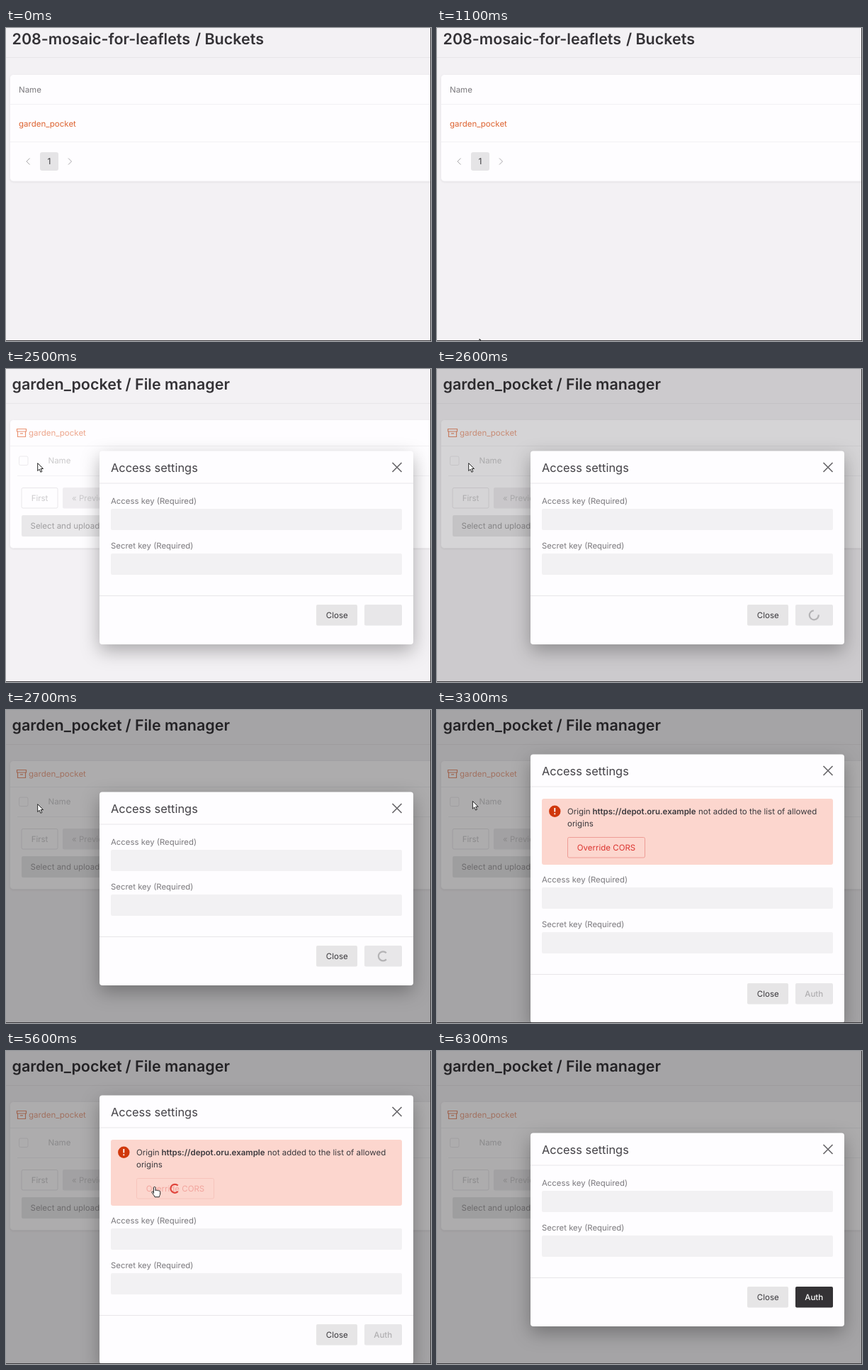
Recreate the animation shown at these times as an HTML page. Size 600 by 441 pixels, loop 7300 ms.

```html
<!DOCTYPE html>
<html lang="en">
<head>
<meta charset="utf-8">
<title>Bucket access</title>
<style>
  html, body { margin: 0; width: 100%; height: 100%; overflow: hidden; background: #f3f1f4; }
  svg { display: block; width: 600px; height: 441px; }
  text { font: 400 11.5px Inter, sans-serif; fill: #7b797d; text-rendering: geometricPrecision; }
  .title { font-size: 21.5px; font-weight: 600; fill: #343236; }
  .end { text-anchor: end; }
  .mid { text-anchor: middle; }
  .rule { stroke: #e8e6e9; }
  .row { stroke: #f2f1f4; }
  .card { fill: #fefdff; stroke: #efedf0; filter: drop-shadow(0 1px 1px rgba(0, 0, 0, .06)); }
  .link { fill: #dd6432; }
  .line { fill: none; stroke: #a9a7ab; stroke-width: 1; }
  .label { font-size: 11.4px; }
  .field { fill: #f2f1f3; }
  .dark { fill: #3b393d; }
  .dim text { fill: #cbcacc; }
  #sheet { fill: #fefdff; filter: drop-shadow(0 9px 13px rgba(0, 0, 0, .3)); }
  .head { font-size: 16.4px; fill: #444247; }
  .arc { fill: none; stroke-width: 2.2; }
  .pointer { fill: #fff; stroke: #222; stroke-width: 1; stroke-linejoin: round; }
</style>
</head>
<body>
<svg viewBox="0 0 600 441">
  <rect width="600" height="441" fill="#f3f1f4"/>

  <g id="list">
    <text class="title" x="8.5" y="22.7">208-mosaic-for-leaflets</text>
    <text class="title end" x="364" y="22.7">/ Buckets</text>
    <path class="rule" d="M0 41.5H600"/>
    <rect class="card" x="5.5" y="65.5" width="620" height="150.5" rx="5"/>
    <path class="row" d="M6 107.5H600M6 160.5H600"/>
    <text x="18" y="90.5">Name</text>
    <text class="link" x="18" y="138.5">garden_pocket</text>
    <rect x="48" y="175" width="26" height="26" rx="3" fill="#e5e4e6"/>
    <path class="line" d="M33.5 183.5L29 188l4.5 4.5M88 183.5l4.5 4.5-4.5 4.5"/>
    <text class="mid dark" x="61" y="192.3" style="font-size:12px">1</text>
    <g id="tip">
      <path d="M54.5 118.5h9L59 124z" fill="#706e71"/>
      <rect x="19.5" y="89.6" width="78.5" height="29.6" rx="3" fill="#706e71"/>
      <text class="mid" x="58.8" y="108.5" style="font-size:10.8px;fill:#fff">File manager</text>
    </g>
  </g>

  <g id="files">
    <text class="title" x="8.5" y="28.7">garden_pocket</text>
    <text class="title end" x="316" y="28.7">/ File manager</text>
    <path class="rule" d="M0 48.5H600"/>
    <g class="dim">
      <rect class="card" x="5.5" y="71.5" width="620" height="181" rx="5"/>
      <path class="row" d="M6 108.5H600M16 150.5H600"/>
      <path d="M15.5 84.5h13v3.5h-13zM16.5 88v7.5h11V88M20 90.8h4" fill="none" stroke="#ea9474" stroke-width="1.2"/>
      <text x="32" y="94" style="fill:#eda68c">garden_pocket</text>
      <rect x="18.5" y="123" width="12.5" height="12.5" rx="2" fill="none" stroke="#eceaed"/>
      <text x="59.5" y="133">Name</text>
      <rect x="22" y="167.5" width="51" height="28.5" rx="2" fill="none" stroke="#e9e7ea"/>
      <text class="mid" x="47.5" y="186">First</text>
      <rect x="80" y="167" width="78" height="29.5" rx="2" fill="#efedf0"/>
      <text x="93" y="186">« Previous</text>
      <rect x="22" y="206" width="126" height="30" rx="2" fill="#e9e8ea"/>
      <text x="34.5" y="225" style="fill:#a09fa1">Select and upload</text>
    </g>
  </g>

  <rect id="shade" width="600" height="441"/>

  <g id="modal">
    <rect id="sheet" x="132" width="443" rx="4"/>
    <g id="top">
      <text class="head" x="148" y="144.5">Access settings</text>
      <path d="M545.5 132l13 13m0-13l-13 13" fill="none" stroke="#6a686c" stroke-width="1.7"/>
      <path class="rule" d="M132 161H575"/>
    </g>
    <g id="alert">
      <rect x="148" y="125" width="411" height="93" rx="3" fill="#fcd6ce"/>
      <circle cx="166.3" cy="142.8" r="8.2" fill="#d0380c"/>
      <path d="M166.3 138v5.5m0 1.8v2" stroke="#fff" stroke-width="1.8"/>
      <text class="dark" x="184" y="147">Origin</text>
      <text class="dark" x="219.5" y="147" style="font-weight:600">https://depot.oru.example</text>
      <text class="dark" x="369" y="147">not added to the list of allowed</text>
      <text class="dark" x="184" y="163.5">origins</text>
      <g id="cors">
        <rect id="corsBox" x="184.5" y="179.5" width="109" height="28.5" rx="2" stroke="#ee9d96"/>
        <text class="mid" x="239" y="198" style="fill:#dc3530">Override CORS</text>
      </g>
      <path class="arc" id="corsSpin" stroke="#e0443c" d="M4.2-4.2A6 6 0 1 0 4.2 4.2"/>
    </g>
    <g id="body">
      <text class="label" x="148" y="190">Access key (Required)</text>
      <rect class="field" x="148" y="197" width="411" height="30" rx="2"/>
      <text class="label" x="148" y="252.5">Secret key (Required)</text>
      <rect class="field" x="148" y="260" width="411" height="30" rx="2"/>
      <path class="rule" d="M132 319.5H575"/>
      <rect x="438" y="332" width="58" height="29.5" rx="2" fill="#e6e5e6"/>
      <text class="mid dark" x="467.3" y="351">Close</text>
      <rect id="authBox" x="506" y="332" width="53" height="29.5" rx="2"/>
      <text id="auth" class="mid" x="532.2" y="351" style="font-weight:500">Auth</text>
      <path class="arc" id="authSpin" stroke="#b4b3b5" d="M4.6-4.6A6.5 6.5 0 1 0 4.6 4.6"/>
    </g>
  </g>

  <g id="cursor">
    <path id="arrow" class="pointer" d="M0 0V10.8L2.5 8.5 4.2 12.6 6.1 11.8 4.4 7.8H7.8Z"/>
    <path id="hand" class="pointer" d="M-1.3 9V1.2a1.3 1.3 0 0 1 2.6 0V5.2c.3-1 2.2-1 2.5.2.5-.9 2-.7 2.3.4.6-.7 1.9-.3 1.9.9V9.5c0 2-1.2 2.6-1.3 4.7H.3C-.2 12-2.9 9.6-3.7 7.8c-.5-1.2 1-2 1.8-1l.6.8z"/>
  </g>

  <path d="M599.5 0V441M0 440.5H600" stroke="#39383b"/>
</svg>

<script>
const LOOP = 7300, STEP = 100, SHIFT = 53, SPIN = 725;
const OPEN = 2200, ERROR = 3200, CLICK = 5400, FIXED = 5900;

// time, x, y
const path = [
  [1100, 60, 438], [1200, 57.5, 432.5], [1300, 57.5, 432.5], [1800, 44.7, 132.7],
  [3200, 44.7, 132.7], [3700, 99, 91.5], [4300, 209.7, 191.5], [FIXED, 209.7, 191.5]
];

const el = {};
document.querySelectorAll('[id]').forEach(n => el[n.id] = n);

const ramp = (t, a, b) => Math.min(1, Math.max(0, (t - a) / (b - a)));
const within = (t, a, b) => t >= a && t < b;
const show = (id, on) => el[id].style.display = on ? '' : 'none';
const fade = (id, value) => el[id].style.opacity = value;
const move = (id, x, y, turn = 0) =>
  el[id].setAttribute('transform', `translate(${x} ${y}) rotate(${turn})`);

function cursorAt(t) {
  const i = Math.max(1, path.findIndex(p => p[0] >= t));
  const [a, x, y] = path[i - 1], [b, u, v] = path[i];
  const k = ramp(t, a, b), e = k * k * (3 - 2 * k);
  return [x + (u - x) * e, y + (v - y) * e];
}

function render(t) {
  const opened = t >= OPEN;
  const failed = within(t, ERROR, FIXED);
  const ready = ramp(t, FIXED, FIXED + 200);
  const busy = within(t, CLICK, FIXED);
  const turn = (t - 2700) / SPIN * 360;
  const off = failed ? SHIFT : 0;

  show('list', !opened);
  show('files', opened);
  fade('tip', ramp(t, 1700, 1900));

  fade('shade', .32 * ramp(t, 2500, 2700));
  fade('modal', ramp(t, 2200, 2500));
  el.sheet.setAttribute('y', 115.5 - off);
  el.sheet.setAttribute('height', 272.5 + 2 * off);
  move('top', 0, -off);
  move('body', 0, off);

  show('alert', failed);
  fade('cors', busy ? .3 : 1);
  el.corsBox.style.fill = within(t, 4200, CLICK) ? '#fce6e1' : 'none';
  show('corsSpin', busy);
  move('corsSpin', 238.5, 193.8, turn);

  show('authSpin', within(t, 2600, ERROR));
  move('authSpin', 532.3, 346.8, turn);
  show('auth', t >= ERROR);
  el.authBox.style.fill = `color-mix(in srgb, #343235 ${ready * 100}%, #e8e7e9)`;
  el.auth.style.fill = `color-mix(in srgb, #fff ${ready * 100}%, #b0afb1)`;

  const visible = within(t, 1100, FIXED);
  const hand = within(t, 1800, OPEN) || t >= 4200;
  show('cursor', visible);
  show('hand', hand);
  show('arrow', !hand);
  if (visible) move('cursor', ...cursorAt(t));
}

// The picture advances ten times a second.
function tick() {
  render(Math.floor(performance.now() % LOOP / STEP) * STEP);
  requestAnimationFrame(tick);
}
tick();
</script>
</body>
</html>
```
